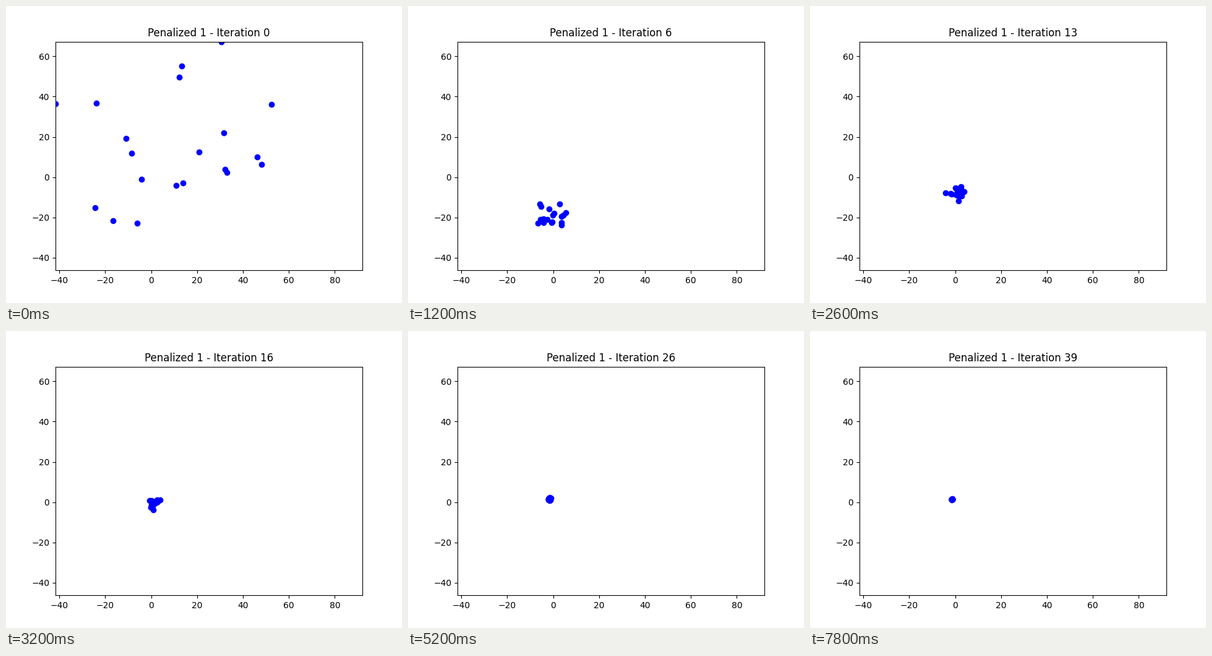
A matplotlib script for the animation above (8 s loop, 640 by 480 pixels).

```python
import numpy as np
import matplotlib.pyplot as plt
from matplotlib.animation import FuncAnimation

STEPS = 40
XLIM = (-41.684, 92.005)
YLIM = (-46.246, 67.294)

# Starting layout of the particles
start = np.array([
    (30.6, 67.2), (13.3, 55.1), (12.3, 49.6), (-41.7, 36.4), (-23.8, 36.7),
    (52.5, 36.1), (-10.9, 19.2), (-8.5, 11.8), (31.5, 21.9), (20.9, 12.4),
    (32.3, 3.8), (33.1, 2.3), (46.3, 10), (48.2, 6.3), (-4.1, -1.1),
    (11, -4.1), (13.9, -2.9), (-24.3, -15.2), (-16.5, -21.6), (-6, -22.9)])

# Swarm centre and radius at a few iterations: step, x, y, spread
path = np.array([
    (2, 34, 0.7, 14), (6, -0.6, -19, 4), (10, -0.8, -12.7, 3),
    (16, 0.9, -0.8, 1.3), (26, -1.7, 1.5, 0.35), (39, -1.4, 1.4, 0.1)])

rng = np.random.default_rng(7)
radius = 0.3 + rng.rayleigh(0.85, (len(start), 1))
speed = rng.uniform(0.8, 2.0, start.shape)
phase = rng.uniform(0, 2 * np.pi, start.shape)


def swarm(step):
    """Particles oscillate around a moving centre while the swarm contracts."""
    x, y, log_spread = (np.interp(step, path[:, 0], col)
                        for col in (path[:, 1], path[:, 2], np.log(path[:, 3])))
    orbit = radius * np.cos(speed * step + phase)
    pos = np.array([x, y]) + np.exp(log_spread) * orbit
    launch = max(0, 1 - step / 2)
    return launch * start + (1 - launch) * pos


fig, ax = plt.subplots(figsize=(6.4, 4.8), dpi=100)
ax.set_xlim(*XLIM)
ax.set_ylim(*YLIM)
dots = ax.scatter(*start.T, color="blue")
title = ax.set_title("Penalized 1 - Iteration 0")


def update(step):
    dots.set_offsets(swarm(step))
    title.set_text(f"Penalized 1 - Iteration {step}")
    return dots, title


anim = FuncAnimation(fig, update, frames=STEPS, interval=200, repeat=True,
                     repeat_delay=0, blit=False)
plt.show()
```
